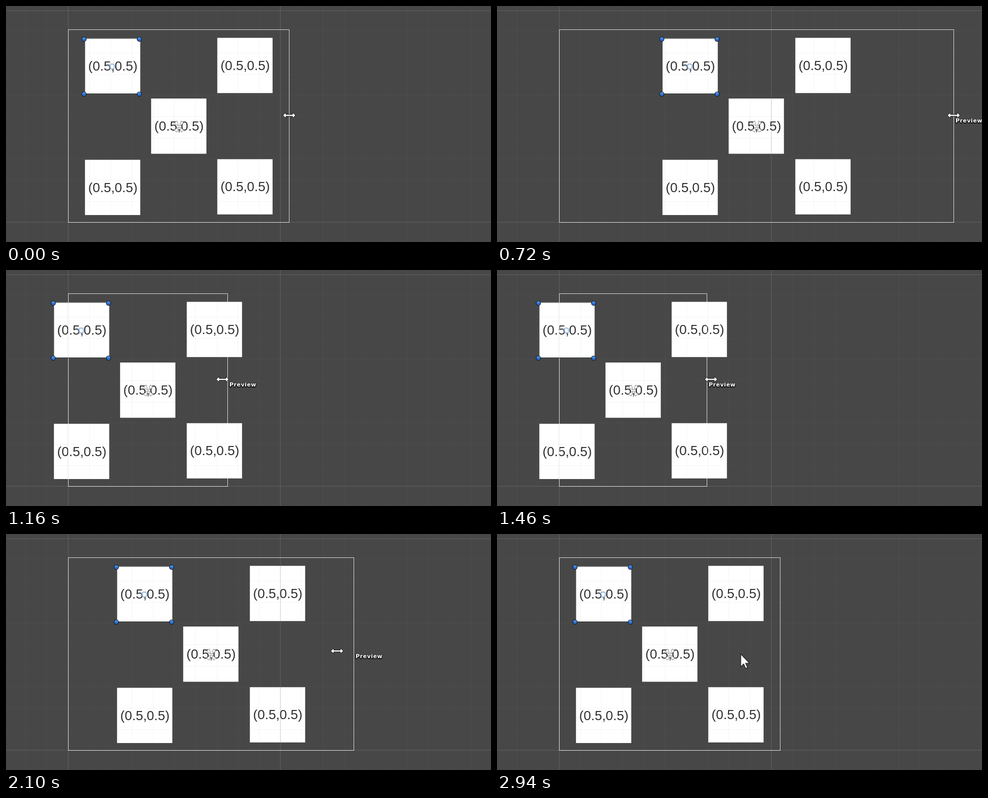
Recreate the animation shown at these times as an HTML page with a canvas. Size 953 by 464 pixels, loop 2.98 s.

```html
<!DOCTYPE html>
<html>
<head>
<meta charset="utf-8">
<style>
html, body { margin: 0; width: 100%; height: 100%; overflow: hidden; background: #474747; }
canvas { display: block; }
</style>
</head>
<body>
<canvas id="stage" width="953" height="464"></canvas>
<script>
const ctx = document.getElementById('stage').getContext('2d');
const W = 953, H = 464, LOOP = 2980;
const LEFT = 122, TOP = 46, BOTTOM = 425, REST_EDGE = 556;
const DRAG_START = 260, RELEASE = 2820, RESET = 2860;
const CURSOR_LEAD = 20;
const CARD = 108.6, COLUMN_GAP = 130.25, ROW_GAP = 119.3;

const clamp = u => Math.max(0, Math.min(1, u));
const smooth = u => u * u * (3 - 2 * u);
const swift = u => smooth(1 - (1 - u) ** 1.9);
const gather = u => 1 - swift(1 - u);
const progress = (t, start, end) => clamp((t - start) / (end - start));

const drags = [
  { start: 252, end: 712, to: 897, ease: gather },
  { start: 872, end: 1280, to: 412, ease: swift },
  { start: 1460, end: 1940, to: 870, ease: swift },
  { start: 1958, end: 2440, to: 478, ease: swift },
];

const edgeAt = t => drags.reduce(
  (x, d) => x + (d.to - x) * d.ease(progress(t, d.start, d.end)), REST_EDGE);

const cursorHeightAt = t => Math.round(215
  - 5 * Math.sin(Math.PI * progress(t, 260, 720))
  + 21 * smooth(progress(t, 1460, 2440)));

function polygon(x, y, points, fill, stroke, width = 1) {
  ctx.beginPath();
  points.forEach(([px, py]) => ctx.lineTo(x + px, y + py));
  ctx.closePath();
  ctx.fillStyle = fill;
  ctx.fill();
  ctx.strokeStyle = stroke;
  ctx.lineWidth = width;
  ctx.stroke();
}

function drawCard(middle, column, row) {
  const x = Math.floor(middle - 53.7 + column * COLUMN_GAP);
  const y = 181.9 + row * ROW_GAP + (column < 0 ? 1.2 : 0);
  ctx.fillStyle = '#fff';
  ctx.fillRect(x + 0.2, y, CARD, CARD);
  ctx.fillStyle = '#303030';
  ctx.font = '26px "Liberation Sans", Arial, sans-serif';
  ctx.textAlign = 'center';
  ctx.fillText('(0.5,0.5)', x + 55, Math.round(y + 63.2));
}

function drawCards(middle) {
  drawCard(middle, 0, 0);
  for (const column of [-1, 1]) for (const row of [-1, 1]) drawCard(middle, column, row);
}

function drawGrid() {
  const step = 41.67;
  const line = (i, pos, vertical) => {
    const major = i % 10 === 0;
    const width = major ? 1.5 : 1;
    const at = Math.round(pos) - (width - 1);
    ctx.fillStyle = `rgba(128,128,128,${major ? 0.3 : 0.08})`;
    if (vertical) ctx.fillRect(at, 0, width, H);
    else ctx.fillRect(0, at, W, width);
  };
  for (let i = -2; i < 20; i++) line(i, LEFT + i * step, true);
  for (let i = 0; i < 11; i++) line(i, 8.6 + i * step, false);
}

function drawHandle(x, y) {
  const shade = ctx.createLinearGradient(0, y - 4, 0, y + 4);
  shade.addColorStop(0, '#6aa8f0');
  shade.addColorStop(0.5, '#2f74d6');
  shade.addColorStop(1, '#2a66c4');
  ctx.beginPath();
  ctx.arc(x, y, 4.3, 0, Math.PI * 2);
  ctx.fillStyle = shade;
  ctx.fill();
  ctx.strokeStyle = '#101c30';
  ctx.lineWidth = 1.2;
  ctx.stroke();
}

function drawSelection(middle) {
  const x = Math.floor(middle - 184);
  ctx.fillStyle = '#b4b4b4';
  ctx.fillRect(x, 64, 1, 108);
  ctx.fillRect(x, 64, 109, 1);
  ctx.fillStyle = '#303a34';
  ctx.fillRect(x, 172, 110, 1);

  ctx.beginPath();
  ctx.arc(middle - 130.8, 119, 5, 0, Math.PI * 2);
  ctx.strokeStyle = 'rgba(130,170,220,0.65)';
  ctx.lineWidth = 3;
  ctx.stroke();

  for (const dx of [-185.7, -77]) for (const y of [65.3, 173.3]) drawHandle(middle + dx, y);
}

function drawAnchors(x, y) {
  for (const sx of [-1, 1]) for (const sy of [-1, 1]) {
    polygon(x, y, [[sx, sy], [sx * 4, sy * 11], [sx * 10, sy * 7]],
      'rgba(255,255,255,0.85)', 'rgba(75,75,75,0.85)', 0.8);
  }
}

function drawResizeCursor(x, y) {
  const right = [[6.5, -1.8], [6.5, -5.5], [12.5, 0], [6.5, 5.5], [6.5, 1.8]];
  const left = right.map(([px, py]) => [-px, -py]);
  polygon(x + 0.5, y, right.concat(left), '#fff', '#141414');
}

function drawArrowCursor(x, y) {
  polygon(x, y, [[0, 0], [0, 25], [5.7, 19.6], [9.6, 28.2], [13.2, 26.6], [9.4, 18.2], [17.2, 18.2]],
    '#fff', '#1c1c24', 1.2);
}

function drawLabel(x, y) {
  ctx.save();
  ctx.font = 'bold 11px "DejaVu Sans", Verdana, sans-serif';
  ctx.letterSpacing = '0.5px';
  ctx.textAlign = 'left';
  ctx.lineJoin = 'round';
  ctx.strokeStyle = '#1a1a1a';
  ctx.lineWidth = 2.5;
  ctx.strokeText('Preview', x, y + 0.5);
  ctx.fillStyle = '#fff';
  ctx.fillText('Preview', x, y);
  ctx.restore();
}

function draw(now) {
  const time = now % LOOP;
  const phase = time < 800 ? 0 : 20;
  const t = Math.floor((time - phase) / 40) * 40 + phase;
  const reset = t >= RESET;
  const edge = reset ? REST_EDGE : Math.round(edgeAt(t));
  const middle = (LEFT + edge) / 2;

  ctx.fillStyle = '#474747';
  ctx.fillRect(0, 0, W, H);
  drawCards(middle);
  drawGrid();

  ctx.strokeStyle = 'rgba(255,255,255,0.8)';
  ctx.lineWidth = 1;
  ctx.strokeRect(LEFT + 0.5, TOP + 0.5, edge - LEFT, BOTTOM - TOP);
  drawSelection(middle);
  drawAnchors(middle + 1, 237);

  const cursorY = cursorHeightAt(t);
  if (t >= DRAG_START && t < RELEASE) drawLabel(edge + 4, cursorY + 14);
  if (reset) drawArrowCursor(479, 236);
  else drawResizeCursor(Math.round(edgeAt(t + CURSOR_LEAD)), cursorY);
}

const start = performance.now();
function tick() {
  draw(performance.now() - start);
  requestAnimationFrame(tick);
}
tick();
</script>
</body>
</html>
```
